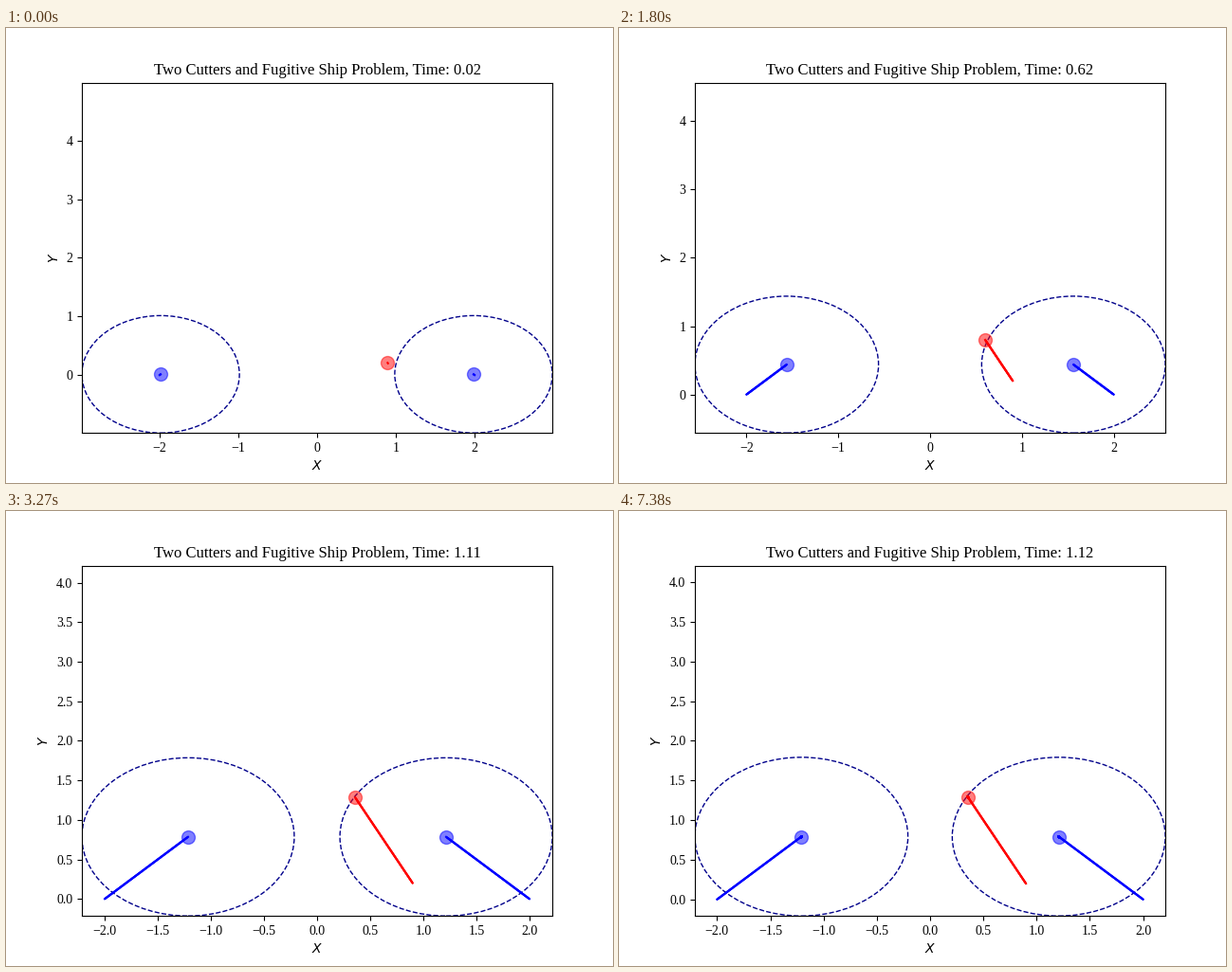
These frames come from a looping animation (640 px wide and 480 px high, 7570 ms). A matplotlib script:

```python
import matplotlib.pyplot as plt
import numpy as np
from matplotlib.animation import FuncAnimation
from matplotlib.collections import LineCollection
from matplotlib.patches import Circle

plt.rcParams["font.family"] = "Liberation Serif"

LOOP_MS = 7570
FRAMES = 253
DT = 0.01
LAST_STEP = 110        # the chase halts here
RADIUS = 1.0
MEETING = np.array([0.0, 2.0])


class Ship:
    """A ship sailing straight for the meeting point, leaving a wake."""

    def __init__(self, ax, start, speed, color, lead):
        self.start = np.array(start)
        course = MEETING - self.start
        self.velocity = speed * course / np.hypot(*course)
        self.lead = lead
        self.marker, = ax.plot([], [], "o", color=color, ms=10, alpha=0.5)
        self.wake = LineCollection([], colors=color, linewidths=1.5,
                                   capstyle="projecting")
        ax.add_collection(self.wake, autolim=False)

    def position(self, step):
        return self.start + self.velocity * DT * (step + self.lead)

    def sail(self, frame):
        # Once halted, the final piece of wake is painted again each frame.
        steps = np.minimum(np.arange(-self.lead + 1, frame + 1), LAST_STEP)
        self.wake.set_segments(
            [(self.position(s - 1), self.position(s)) for s in steps])
        here = self.position(min(frame, LAST_STEP))
        self.marker.set_data([here[0]], [here[1]])
        return here


fig, ax = plt.subplots(figsize=(6.4, 4.8), dpi=100)
ax.set_xlabel("$X$")
ax.set_ylabel("$Y$")
title = ax.set_title("")

cutters = [Ship(ax, (x, 0.0), 1.0, "b", lead=2) for x in (-2.0, 2.0)]
fugitive = Ship(ax, (0.9, 0.2), 1.1, "r", lead=1)
ranges = [Circle((0, 0), RADIUS, fill=False, ls="--", lw=1, ec="darkblue")
          for _ in cutters]
for circle in ranges:
    ax.add_patch(circle)


def update(frame):
    for cutter, circle in zip(cutters, ranges):
        x, y = cutter.sail(frame)
        circle.center = x, y
    fugitive.sail(frame)
    ax.set_xlim(-x - RADIUS, x + RADIUS)
    ax.set_ylim(y - RADIUS, 5 - y)
    time = DT * (min(frame, LAST_STEP) + 2)
    title.set_text(f"Two Cutters and Fugitive Ship Problem, Time: {time:.2f}")
    return []


anim = FuncAnimation(fig, update, frames=FRAMES, interval=LOOP_MS / FRAMES,
                     repeat=True, repeat_delay=0, blit=False)
plt.show()
```
